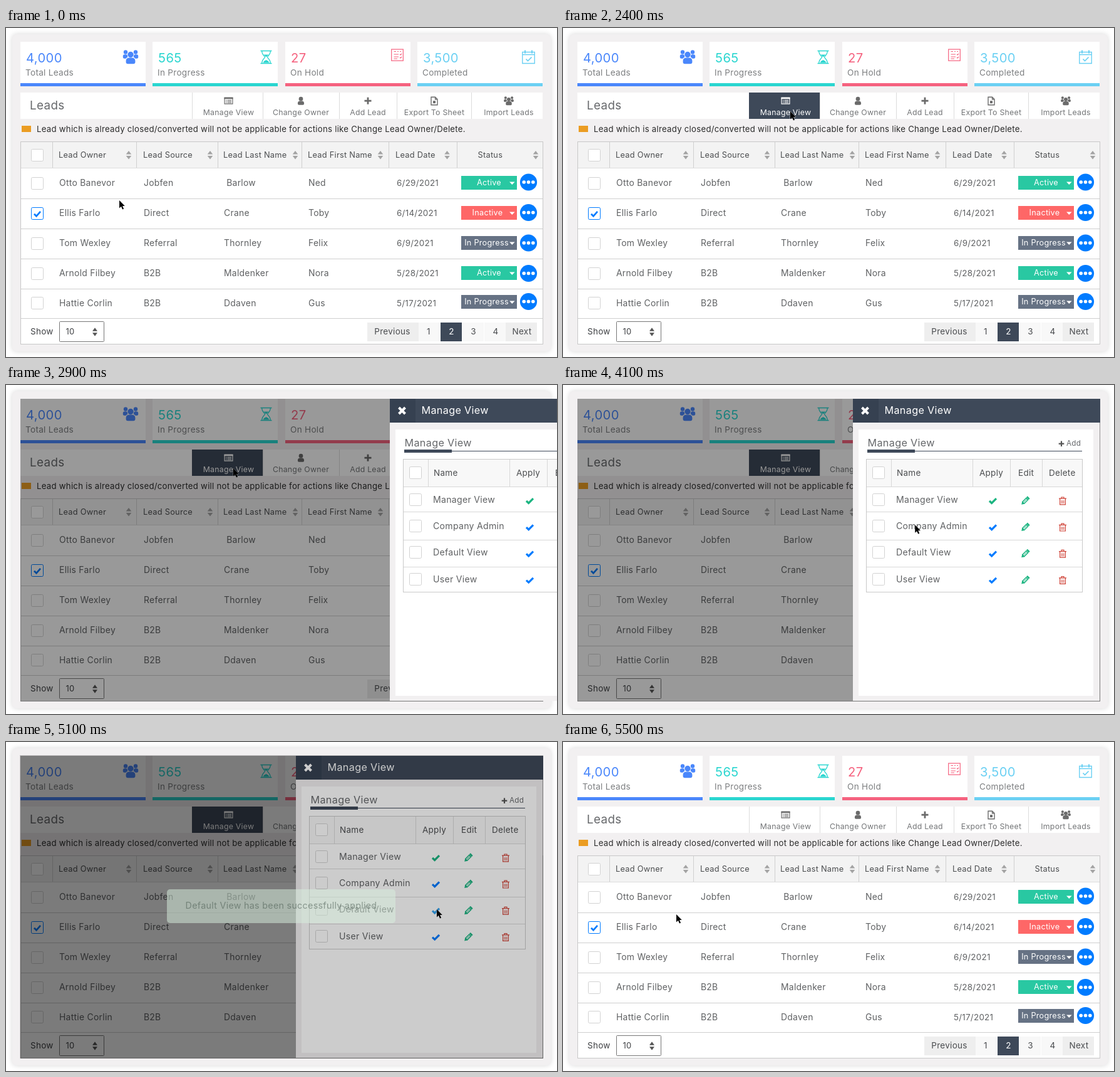
Recreate the animation shown at these times as an HTML page with a canvas. Size 880x525 px, loop 7.6 s.

```html
<!DOCTYPE html>
<html lang="en">
<head>
<meta charset="utf-8">
<title>Leads – Manage View</title>
<style>
html, body { margin: 0; width: 100%; height: 100%; overflow: hidden; background: #fff; }
canvas { display: block; width: 880px; height: 525px; }
</style>
</head>
<body>
<canvas id="stage"></canvas>
<script>
const W = 880, H = 525, LOOP = 7600, STEP = 100;
const canvas = document.getElementById('stage');
const c = canvas.getContext('2d');
const dpr = window.devicePixelRatio || 1;
canvas.width = W * dpr;
canvas.height = H * dpr;

const DARK = '#3e4959', GREEN = '#1bb480', BLUE = '#007bff', RED = '#d0463b';
const PAGE = '#f2f0f1', LINE = '#cfcfcf', BODY = '#5f6163', ICON = '#6b6b6b';
const PANEL_X = 463;

// Drawing helpers
function box(x, y, w, h, color) {
  c.fillStyle = color;
  c.fillRect(x, y, w, h);
}

function frame(x, y, w, h, color, width = 1) {
  c.strokeStyle = color;
  c.lineWidth = width;
  c.strokeRect(x, y, w, h);
}

function text(str, x, y, size, color, align = 'left') {
  c.font = `400 ${size}px Inter, "Open Sans", sans-serif`;
  c.letterSpacing = size * 0.02 + 'px';
  c.textAlign = align;
  c.fillStyle = color;
  c.fillText(str, x, y);
}

function round(x, y, w, h, r, fill, stroke) {
  c.beginPath();
  c.roundRect(x, y, w, h, r);
  if (fill) { c.fillStyle = fill; c.fill(); }
  if (stroke) { c.strokeStyle = stroke; c.lineWidth = 1; c.stroke(); }
}

function disc(x, y, r, color) {
  c.fillStyle = color;
  c.beginPath();
  c.arc(x, y, r, 0, Math.PI * 2);
  c.fill();
}

function poly(points, color) {
  c.fillStyle = color;
  c.beginPath();
  points.forEach(([x, y]) => c.lineTo(x, y));
  c.closePath();
  c.fill();
}

function stroke(d, color, width) {
  c.strokeStyle = color;
  c.lineWidth = width;
  c.stroke(new Path2D(d));
}

function at(x, y, scale, draw) {
  c.save();
  c.translate(x, y);
  c.scale(scale, scale);
  draw();
  c.restore();
}

function triangle(x, y, half, height, color) {
  poly([[x - half, y], [x + half, y], [x, y + height]], color);
}

function sorter(x, y, half, color) {
  triangle(x, y - 1.2, half, -5.5, color);
  triangle(x, y + 1.2, half, 5.5, color);
}

// Icons, each centred on its point
function person(x, y, scale, color) {
  at(x, y, scale, () => {
    disc(0, -3.3, 3.6, color);
    round(-5.5, 0.2, 11, 6.8, [4, 4, 2, 2], color);
  });
}

function group(x, y, scale, color, gap) {
  at(x, y, scale, () => {
    for (const side of [-1, 1]) {
      disc(side * 8, -7.5, 3.2, color);
      round(side * 8.5 - 3.7, -3.8, 7.4, 6.6, 2.5, color);
    }
    disc(0, -3.5, 5.4, gap);
    round(-8.2, 0.4, 16.4, 11, 5, gap);
    disc(0, -3.5, 4.7, color);
    round(-7.4, 1.4, 14.8, 9.8, [5, 5, 3, 3], color);
  });
}

function hourglass(x, y, color) {
  at(x, y, 1, () => {
    stroke('M-9-10H9M-9 10H9', color, 1.5);
    stroke('M-6.8-10C-6.8-3-2-2-2 0S-6.8 3-6.8 10M6.8-10C6.8-3 2-2 2 0S6.8 3 6.8 10', color, 1.3);
    poly([[-4, -4], [4, -4], [0, 0]], color);
    poly([[-5, 9], [-3.5, 6.5], [0, 4.5], [3.5, 6.5], [5, 9]], color);
  });
}

function checklist(x, y, color) {
  at(x, y, 1, () => {
    frame(-9.3, -9, 18.6, 18.2, color, 1.2);
    stroke('M-5.5-5.5H-2M0-5.5H2M4-5.5H6M-5.5-1H2M-5.5 3H2M-5.5 6H0M4-1L5 0L7-2M4 4L5 5L7 3', color, 1.1);
  });
}

function calendar(x, y, color) {
  at(x, y, 1, () => {
    stroke('M-9.7-8V10H9.7V-8ZM-9.7-4H9.7', color, 1.4);
    stroke('M-5.5-11V-6M5.5-11V-6', color, 2);
    stroke('M-4 3L-1 6L5 0', color, 1.7);
  });
}

function listIcon(x, y, color) {
  at(x, y, 1, () => {
    frame(-6.4, -4.9, 12.8, 9.8, color, 1.2);
    box(-7, -5.5, 14, 2.5, color);
    stroke('M-4.5-1H-3M-2-1H4.5M-4.5 1H-3M-2 1H4.5M-4.5 3H-3M-2 3H4.5', color, 1);
  });
}

function plus(x, y, arm, color, width) {
  box(x - arm, y - width / 2, arm * 2, width, color);
  box(x - width / 2, y - arm, width, arm * 2, color);
}

function file(x, y, color) {
  at(x, y, 1, () => {
    stroke('M-5-6H1.5L5-2.5V6.5H-5ZM1.5-6V-2.5H5', color, 1.4);
    box(-2, 0, 4, 4, color);
  });
}

function tick(x, y, color) {
  at(x, y, 1, () => stroke('M-5.5 0.3L-1.8 3.8L5.5-3.5', color, 3.2));
}

function pencil(x, y, color) {
  at(x, y, 1, () => {
    c.rotate(-Math.PI / 4);
    frame(-4, -2, 8.5, 4, color, 1.5);
    box(5.5, -2.7, 2.6, 5.4, color);
    poly([[-4, -2.7], [-4, 2.7], [-8.2, 0]], color);
    stroke('M-3 0H4', color, 0.9);
  });
}

function trash(x, y, color) {
  at(x, y, 1, () => {
    stroke('M-6-3.8H6M-2-4V-6H2V-4M-4.4-3.5V5.8H4.4V-3.5', color, 1.2);
    stroke('M-2-1V4M0-1V4M2-1V4', color, 0.9);
  });
}

function checkbox(x, y, size, checked) {
  round(x + 0.5, y + 0.5, size, size, 2, '#fff', checked ? BLUE : '#d2d2d2');
  if (checked) at(x + 10, y + 10.3, 1, () => stroke('M-5 0.5L-1.5 4L5-3.5', BLUE, 2.7));
}

function pointer([x, y]) {
  at(x, y, 1, () => {
    const arrow = new Path2D('M0 0V12.4L2.9 9.8L5 14.4L7.1 13.4L5 9H8.8Z');
    c.strokeStyle = 'rgba(255,255,255,.7)';
    c.lineWidth = 1;
    c.stroke(arrow);
    c.fillStyle = '#000';
    c.fill(arrow);
  });
}

// Dashboard
const stats = [
  [23, '4,000', 'Total Leads', '#4a87fb', (x, col) => group(x + 176, 46, 1, col, '#fff')],
  [234, '565', 'In Progress', '#2ad6d0', (x, col) => hourglass(x + 181.5, 46.5, col)],
  [446, '27', 'On Hold', '#f5627f', (x, col) => checklist(x + 179, 43, col)],
  [657, '3,500', 'Completed', '#6bd0f3', (x, col) => calendar(x + 177.5, 46.5, col)]
];

// Label, left edge, right edge, centre, icon
const tools = [
  ['Manage View', 297, 410, 355.5, listIcon],
  ['Change Owner', 410, 532, 471, (x, y, col) => person(x, y, 0.92, col)],
  ['Add Lead', 532, 624, 578, (x, y, col) => plus(x, y, 5.5, col, 2.8)],
  ['Export To Sheet', 624, 743, 684, file],
  ['Import Leads', 743, 857, 803, (x, y, col) => group(x, y, 0.64, col, '#fff')]
];

const columns = [
  ['Lead Owner', 84, 196], ['Lead Source', 219, 326], ['Lead Last Name', 347, 462],
  ['Lead First Name', 482, 598], ['Lead Date', 622, 704.5], ['Status', 753.5, 846]
];

const cellX = [85, 220, 348, 483, 624];
const leads = [
  ['Otto Banevor', 'Jobfen', ' Barlow', 'Ned', '6/29/2021', 'Active'],
  ['Ellis Farlo', 'Direct', 'Crane', 'Toby', '6/14/2021', 'Inactive'],
  ['Tom Wexley', 'Referral', 'Thornley', 'Felix', '6/9/2021', 'In Progress'],
  ['Arnold Filbey', 'B2B', 'Maldenker', 'Nora', '5/28/2021', 'Active'],
  ['Hattie Corlin', 'B2B', 'Ddaven', 'Gus', '5/17/2021', 'In Progress']
];
const statusColor = { Active: '#29c8a2', Inactive: '#fe6767', 'In Progress': '#667284' };
const statusX = { Active: 771.5, Inactive: 769, 'In Progress': 767.5 };

const pages = [
  ['Previous', 577, 82, '#eeeeee', 617], ['1', 659, 34, '#f8f8f8', 675], ['2', 694, 34, DARK, 711.5],
  ['3', 729, 34, '#f8f8f8', 746.5], ['4', 764, 34, '#f8f8f8', 782], ['Next', 798, 50, '#eeeeee', 824]
];

function drawCard() {
  box(0, 0, W, H, '#fff');
  c.save();
  c.shadowColor = 'rgba(0,0,0,.16)';
  c.shadowBlur = 8 * dpr;
  round(10, 10, 860, 506, 7, PAGE);
  c.restore();
}

function drawStats() {
  for (const [x, value, label, color, icon] of stats) {
    box(x, 22, 200, 66, '#fff');
    box(x, 88, 200, 5, color);
    text(value, x + 9, 54.7, 20.2, color);
    text(label, x + 8, 76, 13.6, '#7d7f81');
    icon(x, color);
  }
}

function drawTools(hot) {
  box(23, 103, 834, 42, '#fff');
  text('Leads', 38, 130, 18.8, '#66686b');
  tools.forEach(([label, left, right, middle, icon], i) => {
    const on = hot && i === 0;
    if (on) box(left, 103, right - left, 42, DARK);
    else box(left, 103, 1, 42, '#dcdcdc');
    icon(middle, 116.2, on ? '#fff' : ICON);
    text(label, middle, 139, 12.3, on ? '#fff' : '#747678', 'center');
  });
  box(25, 156, 15, 10, '#eb9d23');
  text('Lead which is already closed/converted will not be applicable for actions like Change Lead Owner/Delete.',
    49, 165.7, 13.2, '#2b2b2b');
}

function drawStatus(label, y) {
  box(727, y - 11, 89, 22, statusColor[label]);
  text(label, statusX[label], y + 3.6, 12.7, '#fff', 'center');
  triangle(808.3, y - 1.5, 4.3, 4.5, '#fff');
}

function drawTable() {
  box(23, 181, 835, 324, '#fff');
  box(23, 181, 835, 42, '#f3f3f3');
  for (const x of [74, 208, 338, 472, 611, 720]) box(x, 181, 1, 42, LINE);
  box(23, 223, 835, 1, '#dddddd');
  for (const y of [272, 320, 368, 416, 463]) box(23, y, 835, 1, LINE);
  frame(23.5, 181.5, 834, 323, '#c8c8c8');
  checkbox(40, 193, 19);
  for (const [label, x, arrowX] of columns) {
    text(label, x, 206.7, 12.8, '#4c4e50');
    sorter(arrowX, 202.7, 4.3, '#a3a3a3');
  }
  leads.forEach((lead, i) => {
    const y = 247 + i * 48, last = i === 4;
    checkbox(40, Math.round(238.2 + i * 47.8), 19, i === 1);
    cellX.forEach((x, k) => text(lead[k], x, y + 5, k === 4 ? 13.4 : 13.9, BODY));
    drawStatus(lead[5], last ? 437 : y);
    const dotY = last ? 436.5 : 246 + i * 48.5;
    disc(834.5, dotY, 13.6, BLUE);
    for (const dx of [-7.3, 0, 7.3]) disc(834.5 + dx, dotY, 2.8, '#fff');
  });
}

function drawFooter() {
  text('Show', 39, 489, 13.5, '#3f4144');
  round(85.5, 468.5, 71, 32, 1, '#fff', '#777');
  text('10', 95.5, 489, 13, '#3f4144');
  sorter(142, 485, 4, '#555');
  for (const [label, x, w, color, middle] of pages) {
    box(x, 470, w, 30, color);
    text(label, middle, 489, 13.5, label === '2' ? '#fff' : '#4a4c4f', 'center');
  }
}

// Side panel
const views = ['Manager View', 'Company Admin', 'Default View', 'User View'];

function drawPanel(x, hovered) {
  c.save();
  c.translate(x, 0);
  box(0, 22, 394, 482, PAGE);
  box(0, 22, 395, 38, DARK);
  box(0, 22, 41, 38, '#364151');
  at(19.5, 41, 1, () => stroke('M-5-5L5 5M5-5L-5 5', '#fff', 4));
  text('Manage View', 50.5, 46.3, 16.2, '#fff');

  box(9, 71, 375, 425, '#fff');
  text('Manage View', 23.5, 98.3, 16.2, '#66686b');
  plus(333, 93.7, 4.3, '#555', 2.2);
  text('Add', 341, 97.3, 11.7, '#66686b');
  box(23, 105, 343, 1, DARK);
  box(23, 103, 76, 5, DARK);

  box(21, 118, 345, 44, '#f8f8f8');
  for (const lineX of [61, 191, 251, 302]) box(lineX, 118, 1, 44, '#d8d8d8');
  for (const y of [162, 202, 247, 290]) box(21, y, 345, 1, '#d8d8d8');
  frame(21.5, 118.5, 345, 212, '#c9c9c9');
  checkbox(31, 130, 19);
  [['Name', 70], ['Apply', 202], ['Edit', 264], ['Delete', 313]]
    .forEach(([label, left]) => text(label, left, 145, 13.5, '#4c4e50'));

  views.forEach((view, i) => {
    const y = 183 + i * 42.2;
    checkbox(31, Math.round(y - 10), 19);
    text(view, 69, y + 5, 14.1, BODY);
    tick(223.5, y + 1.7, i === 0 ? GREEN : hovered && i === 2 ? '#35a3f0' : BLUE);
    pencil(275, y + 2, GREEN);
    trash(335, y + 2, RED);
  });
  c.restore();
}

function drawToast(p) {
  box(22, 21, 836, 484, `rgba(0,0,0,${0.4 * p})`);
  c.save();
  c.globalAlpha = p;
  round(257, 235, 365, 54, 5, '#d9f2e0');
  text('Default View has been successfully applied', 439.5, 266.3, 14.3, '#3d4f45', 'center');
  c.restore();
}

// Motion
const progress = (t, from, to) => Math.min(1, Math.max(0, (t - from) / (to - from)));
const easeOut = (u, power) => 1 - (1 - u) ** power;
const mix = (a, b, u) => a + (b - a) * u;

function move(a, b, u) {
  return [mix(a[0], b[0], easeOut(u, 3.3)), mix(a[1], b[1], easeOut(u, 3.9))];
}

function cursorAt(t) {
  const rest = [181, 275], button = [363, 133], apply = [688, 267];
  return t < 4000 ? move(rest, button, progress(t, 900, 1400))
    : move(button, apply, progress(t, 4000, 4400));
}

function draw(time) {
  // The final stretch shows the opening state again.
  const t = time < 5500 ? time : 0;
  const cursor = cursorAt(t);
  const overButton = t >= 4000 || (cursor[0] > 297 && cursor[1] < 141);

  c.setTransform(dpr, 0, 0, dpr, 0, 0);
  drawCard();
  drawStats();
  drawTools(overButton);
  drawTable();
  drawFooter();
  if (t < 4000) pointer(cursor);

  const dim = progress(t, 2400, 2900);
  if (dim > 0) box(23, 22, 835, 483, `rgba(0,0,0,${0.4 * dim})`);
  const panelX = mix(PANEL_X + 525, PANEL_X, progress(t, 2400, 3100));
  if (panelX < W) drawPanel(panelX, t >= 4400);
  if (t >= 4000) pointer(cursor);

  const toast = progress(t, 4800, 5400);
  if (toast > 0) drawToast(toast);
}

function tickFrame() {
  const t = performance.now() % LOOP;
  draw(Math.floor(t / STEP) * STEP);
  requestAnimationFrame(tickFrame);
}
tickFrame();
</script>
</body>
</html>
```
